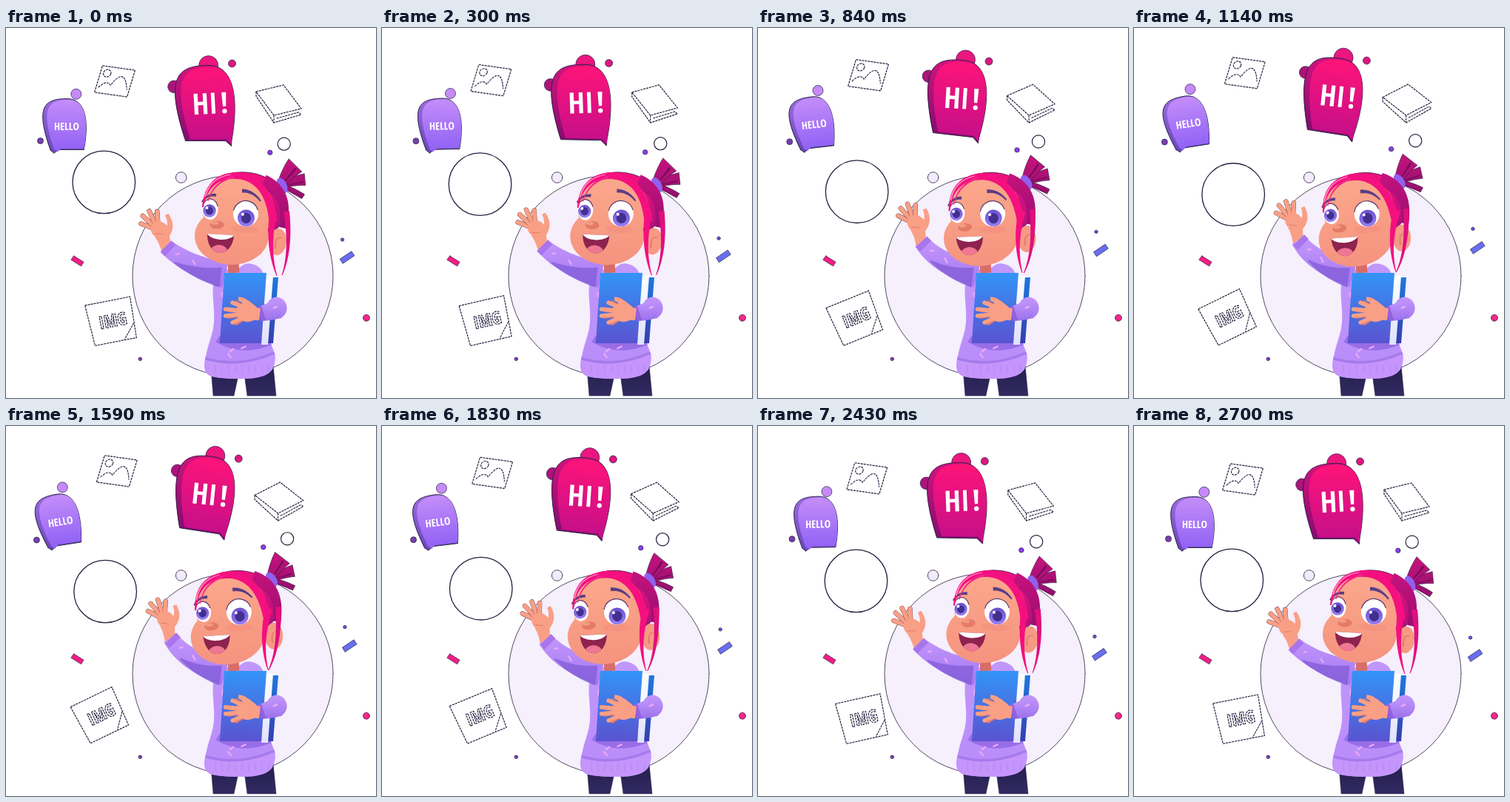
Recreate the animation shown at these times as an HTML page with a canvas. Size 500 by 500 pixels, loop 2.73 s.

```html
<!DOCTYPE html>
<html lang="en">
<head>
<meta charset="utf-8">
<title>Waving student</title>
<style>
  html, body { margin: 0; width: 100%; height: 100%; overflow: hidden; background: #fff; }
  canvas { display: block; width: 500px; height: 500px; }
</style>
</head>
<body>
<canvas id="stage" width="500" height="500"></canvas>
<script>
const ctx = document.getElementById("stage").getContext("2d");
const LOOP = 2730, STEP = 30, SWAY = 2700, FLOOR = 497;
const INK = "#23213f", SKIN = "#f99f86", SKIN_DARK = "#e07a6c";
const PINK = "#f5107f", PLUM = "#a8127a", LILAC = "#b88cf9", VIOLET = "#7d58d6aa", CANDY = "#efaaf7";
const FAMILIES = ["Open Sans Condensed", "Open Sans", "Noto Sans", "Noto Sans Mono", "Roboto"];

// Sway progress: 0 at the loop ends, 1 in the middle.
let p = 0;
const sway = t => (1 - Math.cos(2 * Math.PI * t / SWAY)) / 2;
const mix = (a, b, k = p) => a + (b - a) * k;
const rad = degrees => degrees * Math.PI / 180;

function fade(y0, y1, top, bottom) {
  const g = ctx.createLinearGradient(0, y0, 0, y1);
  g.addColorStop(0, top);
  g.addColorStop(1, bottom);
  return g;
}

function paint(path, fill, line, width = 1) {
  if (fill) { ctx.fillStyle = fill; ctx.fill(path); }
  if (line) { ctx.strokeStyle = line; ctx.lineWidth = width; ctx.stroke(path); }
}

function ellipse(x, y, rx, ry, turn = 0, from = 0, to = 2 * Math.PI) {
  const path = new Path2D();
  path.ellipse(x, y, rx, ry, turn, from, to);
  return path;
}

const oval = (x, y, rx, ry, fill, turn) => paint(ellipse(x, y, rx, ry, turn), fill);
const dot = (x, y, r, fill, width = 0.7) => paint(ellipse(x, y, r, r), fill, INK, width);

function poly(...points) {
  const path = new Path2D();
  points.forEach(([x, y]) => path.lineTo(x, y));
  path.closePath();
  return path;
}

function stroke(line, width, ...points) {
  const path = new Path2D();
  points.forEach(([x, y]) => path.lineTo(x, y));
  paint(path, null, line, width);
}

// Closed curve pulled towards a few control points.
function soft(...points) {
  const path = new Path2D();
  const last = points.length - 1;
  const middle = (a, b) => [(a[0] + b[0]) / 2, (a[1] + b[1]) / 2];
  path.moveTo(...middle(points[last], points[0]));
  points.forEach((a, i) => path.quadraticCurveTo(...a, ...middle(a, points[i === last ? 0 : i + 1])));
  return path;
}

// A bent band from a to b, bowed towards c, whose width runs from w0 to w1.
function limb(fill, a, c, b, w0, w1 = w0, line) {
  const left = [], right = [], steps = 18;
  for (let i = 0; i <= steps; i++) {
    const k = i / steps, half = mix(w0, w1, k) / 2;
    const at = n => mix(mix(a[n], c[n], k), mix(c[n], b[n], k), k);
    const dx = mix(c[0] - a[0], b[0] - c[0], k), dy = mix(c[1] - a[1], b[1] - c[1], k);
    const scale = half / Math.hypot(dx, dy);
    left.push([at(0) - dy * scale, at(1) + dx * scale]);
    right.unshift([at(0) + dy * scale, at(1) - dx * scale]);
  }
  paint(poly(...left, ...right), fill, line, 0.6);
}

function placed(x, y, degrees, draw) {
  ctx.save();
  ctx.translate(x, y);
  ctx.rotate(rad(degrees));
  draw();
  ctx.restore();
}

function within(path, draw) {
  ctx.save();
  ctx.clip(path);
  draw();
  ctx.restore();
}

const fontOf = (family, size) => `bold extra-condensed ${size}px "${family}", sans-serif`;

// The narrowest installed face suits the tall lettering best.
const family = FAMILIES.map(name => {
  ctx.font = fontOf(name, 40);
  return { name, width: ctx.measureText("HELLO").width };
}).reduce((a, b) => b.width < a.width ? b : a).name;

function label(text, size, room, line) {
  ctx.font = fontOf(family, size);
  ctx.font = fontOf(family, size * Math.min(1, room / ctx.measureText(text).width));
  ctx.textAlign = "center";
  const y = ctx.measureText(text).actualBoundingBoxAscent / 2;
  ctx.fillStyle = "#fff";
  ctx.fillText(text, 0, y);
  if (!line) return;
  ctx.strokeStyle = line;
  ctx.lineWidth = 1.2;
  ctx.strokeText(text, 0, y);
}

function backdrop(late) {
  dot(306.5, 335, 135.5, "#f6effc", 0.8);
  dot(236.7, 202, 7.3, "#f3eafb", 0.8);
  dot(mix(132.3, 134.3), mix(208.3, 225.6, late), 42.3, null, 1.3);
  dot(mix(375.7, 380.5), mix(156.7, 152), 8.6, null, 1.2);
  dot(mix(356.8, 347), mix(168.3, 163.3), 3.2, "#8c3df0");
  dot(mix(454.6, 458.2), mix(286, 270.5), 2.2, "#5f5be0");
  dot(487, 391.7, 4.5, "#f3288a");
  dot(181.3, 447.3, 2.3, "#823bd0");
  const chip = (x, y, degrees, w, h, fill) => placed(x, y, degrees, () =>
    paint(poly([-w, -h], [w, -h], [w, h], [-w, h]), fill, INK, 0.6));
  chip(96.5, 314.8, 32, 8, 3.3, "#f41c86");
  chip(mix(461, 464.5), mix(310, 296), -34, 9.5, 3.6, "#686ef0");
}

function pictureIcon() {
  placed(mix(147, 150), mix(72, 60), 0, () => {
    ctx.transform(1, 0.14, -0.3, 1, 0, 0);
    paint(poly([-22, -18], [22, -18], [22, 18], [-22, 18]), "#fff", INK, 1.2);
    const hills = new Path2D();
    hills.moveTo(-19, 11);
    hills.quadraticCurveTo(-11, -1, -4, 6);
    hills.quadraticCurveTo(8, -22, 19, 9);
    paint(hills, null, INK, 1.1);
    dot(-13, -9, 5, null, 1.1);
  });
}

function bookIcon() {
  const a = [mix(338, 336), mix(86, 94)];
  const across = [mix(37, 34), mix(-9, -18)], down = [mix(24, 32), mix(32, 24)];
  const corner = (u, v, drop = 0) => [a[0] + u * across[0] + v * down[0], a[1] + u * across[1] + v * down[1] + drop];
  paint(poly(corner(0, 0), corner(1, 0), corner(1, 1), corner(0, 1)), "#fff", INK, 1.2);
  stroke(INK, 1.2, corner(0, 0), corner(0, 0, 6), corner(0, 1, 10), corner(1, 1, 8));
  stroke(INK, 1.1, corner(0, 1), corner(0, 1, 10));
  stroke(INK, 1.1, corner(0.1, 1, 5), corner(0.9, 1, 4), corner(1, 1, 8));
}

function imageCard() {
  placed(mix(142.5, 126), mix(396.5, 391), mix(-11, -27), () => {
    paint(poly([-31, -28], [31, -28], [29, 28], [-28, 28]), "#fff", INK, 1.2);
    stroke(INK, 1.1, [29, 8], [13, 27]);
    ctx.translate(2, -1);
    label("IMG", 30, 38, INK);
  });
}

function icons() {
  ctx.lineCap = "butt";
  ctx.setLineDash([3, 1]);
  pictureIcon();
  bookIcon();
  imageCard();
  ctx.setLineDash([]);
}

// Arched balloon of size w by h, its tail at a share of the width.
function balloon(w, h, tail) {
  const path = new Path2D();
  path.moveTo(-0.35 * w, h / 2);
  path.bezierCurveTo(-0.72 * w, -0.35 * h, -0.5 * w, -h / 2, 0.06 * w, -h / 2);
  path.bezierCurveTo(0.48 * w, -h / 2, 0.6 * w, -0.1 * h, 0.46 * w, h / 2);
  path.lineTo(Math.min(0.46, tail + 0.1) * w, h / 2);
  path.lineTo(tail * w, 0.57 * h);
  path.lineTo((tail - 0.1) * w, h / 2);
  path.closePath();
  return path;
}

function bubble(w, h, tail, side, front) {
  paint(balloon(w, h, tail), fade(-h / 2, h / 2, ...side), INK, 0.9);
  ctx.save();
  ctx.translate(0.05 * w, 0);
  paint(balloon(0.9 * w, 0.96 * h, tail), fade(-h / 2, h / 2, ...front));
  ctx.restore();
}

function bubbles() {
  dot(mix(94.8, 74.8), mix(89.3, 82.3), 7, "#c68af9");
  dot(mix(46.5, 41), mix(152.5, 154.2), 4, "#783eae");
  placed(mix(79.5, 70), mix(130, 126.5), mix(0, -9.5), () => {
    bubble(56, 69, -0.26, ["#9b6be0", "#6c48b8"], ["#c58ef9", "#9162f5"]);
    ctx.translate(2.5, 3);
    label("HELLO", 18, 34);
  });
  dot(mix(273.7, 283.6), mix(50.5, 39.5), 13, "#ec167f");
  dot(mix(227, 232), mix(79.3, 58.8), 8.3, "#ad147b");
  dot(mix(305.5, 315), mix(48, 43.8), 5, "#dc1780");
  placed(mix(269.5, 269), mix(101.5, 90.5), mix(0, 9.5), () => {
    bubble(77, 102, 0.455, ["#d0147e", "#850d70"], ["#ff1478", "#c60f89"]);
    ctx.translate(6.5, 0.5);
    ctx.rotate(rad(-3));
    ctx.wordSpacing = "-6px";
    label("HI !", 50, 50);
  });
}

function sprinkles(count, x, y, w, h) {
  let seed = 7;
  const random = () => (seed = seed * 16807 % 2147483647) / 2147483647;
  ctx.lineCap = "round";
  for (let i = 0; i < count; i++) {
    const cx = x + w * random(), cy = y + h * (i + random()) / count, turn = 3 * random();
    const dx = 3 * Math.cos(turn), dy = 3 * Math.sin(turn);
    stroke(CANDY, 2.2, [cx - dx, cy - dy], [cx + dx, cy + dy]);
  }
}

function body() {
  const trousers = fade(465, FLOOR, "#272050", "#322b62");
  paint(poly([277, 460], [316, 460], [308, FLOOR], [280, FLOOR]), trousers, INK, 0.5);
  paint(poly([321, 460], [361, 456], [365, FLOOR], [326, FLOOR]), trousers, INK, 0.5);
  const torso = soft([286, 317], [307, 332], [326, 314], [354, 330], [354, 420], [367, 446], [354, 474],
    [282, 474], [266, 464], [272, 432], [283, 400], [278, 350]);
  paint(torso, fade(320, 470, "#c097fb", LILAC));
  within(torso, () => {
    limb("#986de7", [286, 420], [320, 440], [360, 422], 10);
    sprinkles(12, 276, 345, 78, 105);
    limb("#a67aec", [266, 446], [316, 462], [366, 438], 5);
    limb("#c595fb", [266, 460], [316, 474], [366, 452], 24);
    for (let x = 283; x < 360; x += 9) stroke("#b486f3", 1, [x, 455], [x, 466]);
  });
  limb("#d76d69", [307, 308], [307, 320], [308, 331], 15);
}

function raisedHand() {
  placed(mix(217, 222), mix(300, 289), mix(0, 8), () => {
    ctx.lineCap = "round";
    for (let i = 0; i < 4; i++) {
      const turn = rad(-160 + 22 * i), reach = 25 + 4 * Math.sin(i * Math.PI / 3);
      const tip = [-11 + reach * Math.cos(turn), -27 + reach * Math.sin(turn)];
      stroke("#57303f", 6.4, [-11, -27], tip);
      stroke(SKIN, 5.8, [-11, -27], tip);
    }
    limb(SKIN, [0, -22], [9, -34], [0, -48], 10, 5);
    oval(-9, -27, 13, 11, SKIN, 0.6);
    limb(SKIN, [-7, -22], [-2, -12], [0, 4], 20, 12);
    stroke(SKIN_DARK, 1, [-15, -22], [-5, -22]);
  });
}

function wavingArm() {
  raisedHand();
  const wrist = [mix(216, 223), mix(295, 286)], elbow = [mix(245, 240), mix(321, 316)];
  limb(fade(286, 350, "#c396fc", "#a378f0"), wrist, elbow, [296, 334], 21, 34);
  limb(VIOLET, [mix(228, 236), mix(317, 314)], [mix(258, 262), 333], [290, 337], 2, 27);
  limb("#a875ed", wrist, wrist.map(n => n + 3), wrist.map(n => n + 6), 21);
  stroke(CANDY, 2.2, [252, mix(314, 309)], [256, mix(320, 317)]);
  stroke(CANDY, 2.2, [mix(229, 234), mix(306, 299)], [mix(234, 240), mix(305, 299)]);
}

function bookAndArm() {
  const slab = (left, right, top, bottom, ...colors) => paint(
    poly([left, top], [right, top], [right - 7, bottom], [left - 6, bottom]), fade(top, bottom, ...colors));
  slab(358, 368, 337, 426, "#1e79dc", "#343faf");
  slab(351, 361, 335, 428, "#ffffff", "#dfe2fb");
  slab(295, 352, 331, 426, "#3294f7", "#5953d0");
  oval(366, 378, 13.5, 14.5, fade(363, 393, "#c397fb", "#a378ee"), -0.3);
  limb(fade(372, 396, "#bd91fa", "#9b70eb"), [344, 386], [356, 384], [368, 379], 20, 27);
  limb("#935fe0", [342, 387], [345, 386], [348, 385], 20);
  stroke(CANDY, 2.2, [361, 379], [367, 376]);
  ctx.lineCap = "round";
  for (let i = 0; i < 4; i++) {
    const tip = [306 - 11 * Math.sin(i * Math.PI / 3), 371 + 9 * i];
    stroke(SKIN_DARK, 6.2, [326, 380 + 3 * i], [tip[0] + 5, tip[1] + 0.6]);
    stroke(SKIN, 5.4, [326, 380 + 3 * i], tip);
  }
  limb(SKIN, [314, 366], [320, 366], [330, 376], 5, 9);
  oval(326, 384, 15, 13, SKIN, 0.2);
  limb(SKIN, [326, 384], [334, 386], [343, 387], 20, 16);
}

function bun() {
  const knot = [371, 213];
  const toward = (degrees, reach) => [knot[0] + reach * Math.cos(rad(degrees)), knot[1] + reach * Math.sin(rad(degrees))];
  for (let i = 2; i >= 0; i--) {
    const turn = -54 + 40 * i;
    limb(fade(181, 230, "#c4127d", "#94106d"), knot, toward(turn - 8, 18), toward(turn, 34), 10 - 2 * i, 25 - 9 * i, INK);
    limb("#770c5c", knot, toward(turn + 8, 18), toward(turn + 5, 31), 1, 3 - i);
  }
  oval(373, 213, 6.5, 11, "#9160ee", -0.45);
}

function eye(x, y, rx, ry, ix, iy, r) {
  const white = ellipse(x, y, rx, ry);
  paint(white, "#fff");
  within(white, () => {
    oval(ix, iy, r, r, fade(iy - r, iy + r, "#6b50cd", "#9a80f5"));
    oval(ix, iy, r * 0.58, r * 0.62, "#41308f");
    oval(ix - r * 0.4, iy - r * 0.45, 2, 2, "#fff");
  });
  paint(ellipse(x, y, rx, ry, 0, 3.4, 6), null, "#5b3468", 1.2);
}

function mouth() {
  placed(290, 279, 3, () => {
    const opening = ellipse(0, 0, 18, 25, 0, 0, Math.PI);
    paint(opening, "#8d234e");
    within(opening, () => {
      oval(-1, 24, 12, 10, "#ee7793");
      oval(0, -3, 19, 10, "#fff");
    });
  });
}

function face() {
  const skin = fade(205, 320, "#fba78b", "#f5937f");
  oval(314, 246, 48, 46, skin);
  oval(305, 281, 50, 39, skin);
  oval(367, 289, 12, 18, "#f69a84", 0.12);
  limb(SKIN_DARK, [364, 298], [363, 281], [373, 284], 2, 1);
  oval(322, 272, 19, 5, "#f08a7877", 0.08);
  eye(276, 245, 10.5, 14, 275, 247, 8.7);
  eye(324, 251, 17, 17.5, 324.5, 257, 11.5);
  limb("#5a3d85", [265, 235], [272, 224], [284, 226], 2, 4);
  limb("#5a3d85", [319, 220], [334, 220], [344, 234], 5, 2);
  oval(285, 266, 9.5, 5.5, "#e47a69");
  oval(282, 263.5, 5, 2.3, "#f49b82");
  mouth();
}

function fringe() {
  limb(fade(205, 275, "#c2127c", "#970e70"), [348, 208], [384, 222], [374, 270], 20, 9);
  limb(PINK, [322, 200], [272, 194], [266, 242], 10, 2);
  limb(PINK, [306, 199], [355, 200], [361, 262], 8, 11);
  limb("#f5248a", [308, 201], [280, 208], [273, 234], 3, 1);
  limb("#ff8fc0", [304, 198], [276, 202], [269, 228], 1, 2);
}

function head() {
  placed(mix(315, 312.2), mix(305, 306), mix(0, -7.5), () => {
    ctx.translate(-315, -305);
    bun();
    paint(ellipse(324, 239, 57, 44, 0.15), fade(195, 280, PINK, PLUM), INK, 0.7);
    face();
    fringe();
  });
  const lock = (x, y, bendX, bendY, tipX, tipY, w, fill) => limb(fill, [x, y], [bendX, bendY], [tipX, tipY], w, 1);
  lock(mix(379, 367), mix(248, 244), mix(386, 369), 300, mix(373, 353), mix(334, 330), 8, "#e00f7c");
  lock(mix(361, 355), mix(250, 246), mix(353, 342), mix(298, 290), mix(366, 353), mix(335, 329), 10, PINK);
}

function frame(now) {
  const t = Math.floor((now % LOOP) / STEP) * STEP;
  p = sway(t);
  ctx.fillStyle = "#fff";
  ctx.fillRect(0, 0, 500, 500);
  backdrop(sway(t + 55));
  icons();
  bubbles();
  body();
  wavingArm();
  head();
  bookAndArm();
  requestAnimationFrame(frame);
}
requestAnimationFrame(frame);
</script>
</body>
</html>
```
